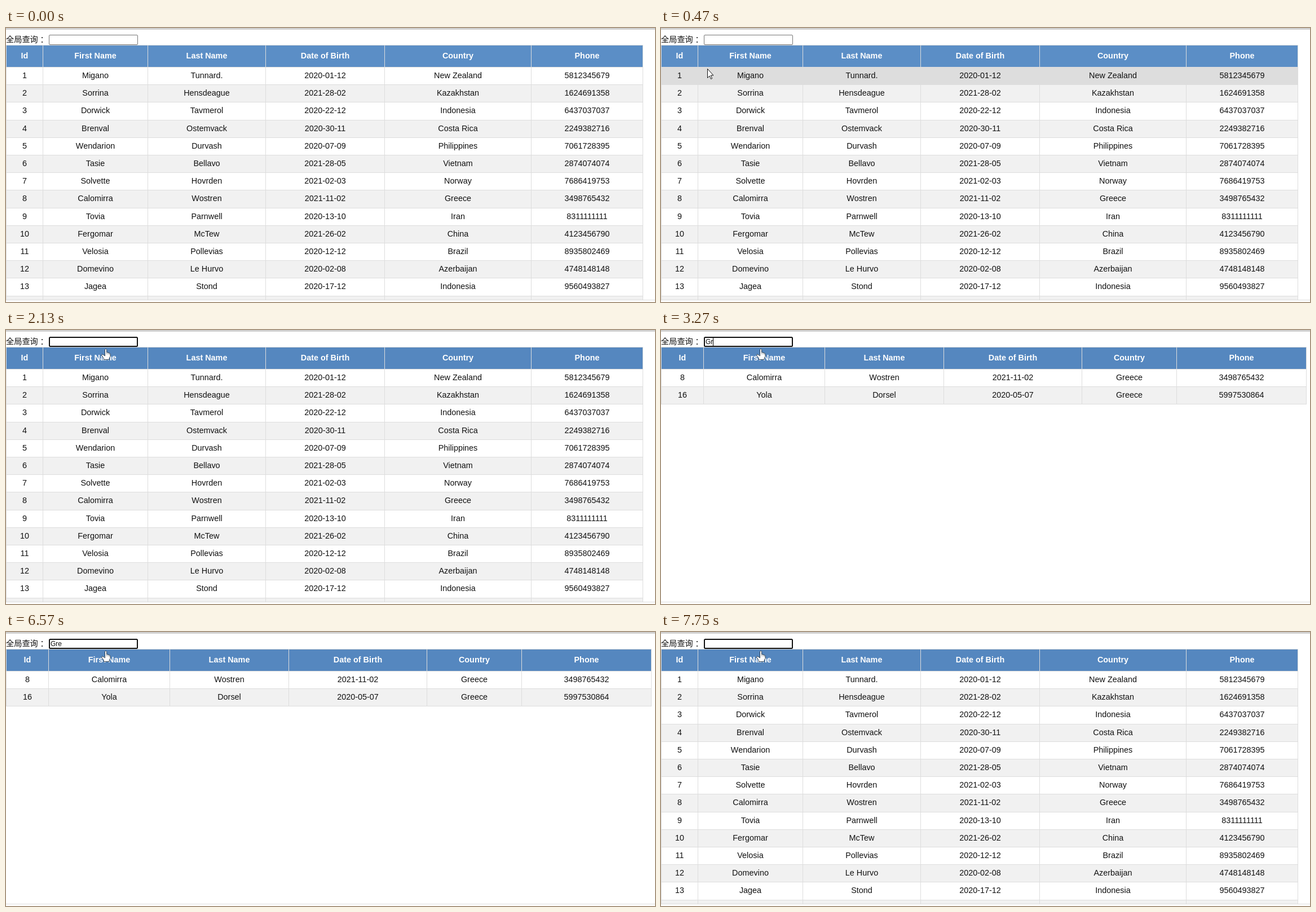
An HTML page with a canvas for the animation above (8 s loop, 1151x486 px).

```html
<!DOCTYPE html>
<html lang="zh">
<head>
<meta charset="utf-8">
<style>
  html, body { margin: 0; width: 100%; height: 100%; overflow: hidden; background: #fff; }
  canvas { display: block; }
</style>
</head>
<body>
<canvas id="stage" width="1151" height="486"></canvas>
<script>
const ctx = document.getElementById('stage').getContext('2d');
const SANS = '"Liberation Sans", Arial, sans-serif';
const CJK = '14.2px "Noto Sans CJK SC", "Noto Sans CJK", sans-serif';
const HEAD = ['Id', 'First Name', 'Last Name', 'Date of Birth', 'Country', 'Phone'];
const HEAD_Y = 30, BODY_Y = 69, ROW_H = 31.2, BOTTOM = 482;

const people = `1,Migano,Tunnard.,2020-01-12,New Zealand
2,Sorrina,Hensdeague,2021-28-02,Kazakhstan
3,Dorwick,Tavmerol,2020-22-12,Indonesia
4,Brenval,Ostemvack,2020-30-11,Costa Rica
5,Wendarion,Durvash,2020-07-09,Philippines
6,Tasie,Bellavo,2021-28-05,Vietnam
7,Solvette,Hovrden,2021-02-03,Norway
8,Calomirra,Wostren,2021-11-02,Greece
9,Tovia,Parnwell,2020-13-10,Iran
10,Fergomar,McTew,2021-26-02,China
11,Velosia,Pollevias,2020-12-12,Brazil
12,Domevino,Le Hurvo,2020-02-08,Azerbaijan
13,Jagea,Stond,2020-17-12,Indonesia
16,Yola,Dorsel,2020-05-07,Greece
19,Hugolen,Mandor,2020-22-09,Ukraine
20,Nellun,Whitmoss,2020-11-07,Portugal
22,Ragento,Lovas,2021-14-04,China
23,Terenvo,Hollrun,2020-01-12,Portugal
26,Yuskan,Talmuss,2021-13-04,Afghanistan
29,Jovelle,Pagstow,2021-30-05,China`.split('\n').map(line => {
  const row = line.split(',');
  return [...row, String(1e9 + row[0] * 4812345679 % 9e9)];
});

// Column edges for an empty, a one-letter and a longer query
const layouts = [
  [0, 65, 251, 460, 671, 931, 1129],
  [0, 70, 271, 477, 706, 930, 1144],
  [0, 75, 290, 501, 746, 914, 1144]
];
const typing = [[0, ''], [2600, 'G'], [3270, 'Gr'], [3730, 'Gre'], [4910, 'Gree'],
  [6570, 'Gre'], [6900, 'Gr'], [7280, 'G'], [7750, '']];
const caretOn = [[1600, 2130], [2600, 3080], [3270, 4250], [4780, 5420], [5970, 6500], [7030, 7550]];
const FOCUS = 1600;

// Pointer path: time, x, y
const path = [[200, 1150, 486], [270, 760, 330], [340, 380, 180], [470, 82, 72], [520, 82, 72],
  [950, 173, 21], [1600, 173, 21], [1670, 175, 16], [1800, 177, 33], [8000, 177, 33]];

const shapes = {
  arrow: new Path2D('M.5 .5V16.5L4 13L6.5 18.5L8.7 17.5L6.2 12H11Z'),
  hand: new Path2D('M-1.5 1.5Q0 -.7 1.5 1.5V6.5L4 7L6.5 8L8 9.5V14L6 17.5V19.5H-3.5V17.5L-7.5 11.5Q-7.5 9.5 -5 10.5L-1.5 13Z'),
  beam: new Path2D('M-3 -7.5H-1L0 -6.5L1 -7.5H3M0 -6.5V6.5M-3 7.5H-1L0 6.5L1 7.5H3')
};

function fill(color, x, y, w, h) {
  ctx.fillStyle = color;
  ctx.fillRect(x, y, w, h);
}

function text(str, x, y, font, color = '#111', align = 'center') {
  ctx.font = font;
  ctx.fillStyle = color;
  ctx.textAlign = align;
  ctx.fillText(str, x, y);
}

function pointerAt(t) {
  const i = path.findIndex(p => p[0] > t);
  if (i < 1) return null;
  const [t0, x0, y0] = path[i - 1], [t1, x1, y1] = path[i];
  const k = (t - t0) / (t1 - t0);
  return { x: Math.round(x0 + (x1 - x0) * k), y: Math.round(y0 + (y1 - y0) * k) };
}

function drawInput(t, query) {
  text('全局查询', 0, 25, CJK, '#111', 'left');
  text('：', 60.5, 25, CJK, '#111', 'left');
  const focused = t >= FOCUS;
  const line = focused ? 2 : 1;
  ctx.lineWidth = line;
  ctx.strokeStyle = focused ? '#101010' : '#767676';
  ctx.beginPath();
  ctx.roundRect(76 + line / 2, 12 + line / 2, 158 - line, 18 - line, 1.5);
  ctx.stroke();
  text(query, 79, 25, '12px ' + SANS, '#111', 'left');
  if (caretOn.some(([a, b]) => t >= a && t < b)) {
    ctx.font = '12px ' + SANS;
    fill('#000', Math.floor(79 + ctx.measureText(query).width), 14, 1, 14);
  }
}

function drawTable(t, query, pointer) {
  const edges = layouts[Math.min(query.length, 2)];
  const right = edges[6];
  const needle = query.toLowerCase();
  const rows = people.filter(row => row.join(' ').toLowerCase().includes(needle));
  const rowY = i => Math.round(BODY_Y + ROW_H * i);
  const cells = (row, y, font, color) => row.forEach((str, c) =>
    text(str, (edges[c] + edges[c + 1] + 1) / 2, y, font, color));

  ctx.save();
  ctx.beginPath();
  ctx.rect(0, 0, 1151, BOTTOM);
  ctx.clip();
  fill(t < 700 ? '#5b8ec6' : '#5587bf', 0, HEAD_Y, right, BODY_Y - HEAD_Y);
  cells(HEAD, 54, 'bold 14.4px ' + SANS, '#fff');
  rows.forEach((row, i) => {
    const y = rowY(i), next = rowY(i + 1);
    const hover = pointer && pointer.x <= right && pointer.y >= y && pointer.y < next;
    fill(hover ? '#ddd' : i % 2 ? '#f1f1f1' : '#fff', 0, y, right, next - y);
    cells(row, y + 20, '14.4px ' + SANS);
  });
  const end = rowY(rows.length);
  for (const x of edges) fill('#ddd', x, HEAD_Y, 1, end - HEAD_Y);
  fill('#ddd', 0, HEAD_Y, right + 1, 1);
  for (let i = 0; i <= rows.length; i++) fill('#ddd', 0, rowY(i), right + 1, 1);
  ctx.restore();
}

function drawPointer({ x, y }) {
  const overInput = x >= 76 && x < 234 && y >= 12 && y < 30;
  const kind = overInput ? 'beam' : y >= HEAD_Y && y < BODY_Y ? 'hand' : 'arrow';
  ctx.save();
  ctx.translate(x, y);
  ctx.lineWidth = 1;
  ctx.strokeStyle = kind === 'hand' ? '#345' : '#111';
  ctx.fillStyle = '#fff';
  if (kind !== 'beam') ctx.fill(shapes[kind]);
  ctx.stroke(shapes[kind]);
  if (kind === 'hand') {
    ctx.lineWidth = .5;
    ctx.stroke(new Path2D('M1.5 6.5V10M4 7V10.5M6.3 8V11'));
  }
  ctx.restore();
}

function frame(now) {
  const t = now % 8000;
  const query = typing.findLast(([start]) => t >= start)[1];
  const pointer = pointerAt(t);
  fill('#fff', 0, 0, 1151, 486);
  fill('#9a9a9a', 0, 1, 1151, 1);
  fill('#eee', 0, 2, 1151, 1);
  drawTable(t, query, pointer);
  drawInput(t, query);
  fill('#ddd', 0, BOTTOM, 1151, 1);
  if (pointer) drawPointer(pointer);
}

const start = performance.now();
function tick() {
  frame(performance.now() - start);
  requestAnimationFrame(tick);
}
tick();
</script>
</body>
</html>
```
